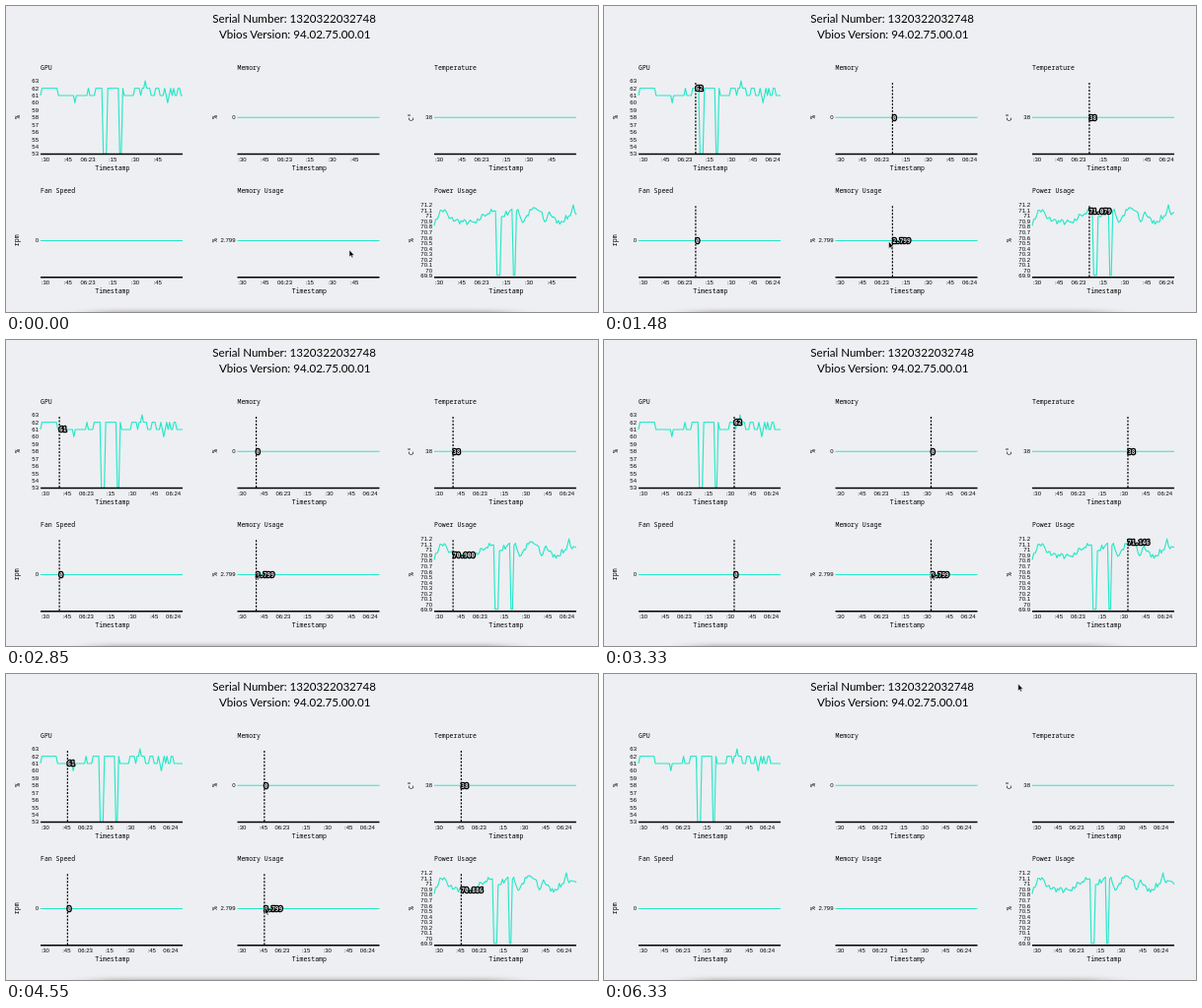
Animation, 600 px wide and 311 px high, one loop 6360 ms. Source, as an HTML page:

```html
<!DOCTYPE html>
<html lang="en">
<head>
<meta charset="utf-8">
<title>GPU monitor</title>
<style>
  html, body { margin: 0; width: 100%; height: 100%; overflow: hidden; background: #eeeff2; }
  svg { display: block; width: 600px; height: 311px; }
  text { dominant-baseline: central; text-anchor: middle; white-space: pre; fill: #000; }
  .head { font: 11.6px Lato, sans-serif; text-anchor: start; dominant-baseline: alphabetic; }
  .mono { font: 6.5px "Noto Sans Mono", monospace; }
  .tick { font: 6px "Liberation Sans", Arial, sans-serif; }
  .end { text-anchor: end; }
  .start { text-anchor: start; }
  .curve { fill: none; stroke: #26e8c8; stroke-width: 1.15; stroke-linejoin: round; }
  .axis { stroke: #000; stroke-width: 1.5; }
  .rule { stroke: #000; stroke-width: 1.2; stroke-dasharray: 2 1.5; }
  .tip { font: bold 6.1px "Noto Sans Mono", monospace; text-anchor: start; fill: #d8dadc;
         stroke: #000; stroke-width: 2.6; stroke-linejoin: round; paint-order: stroke; }
</style>
</head>
<body>
<svg id="stage" viewBox="0 0 600 311">
  <defs>
    <filter id="soft" x="-20%" y="-300%" width="140%" height="700%"><feGaussianBlur stdDeviation="16 2.2"/></filter>
  </defs>
  <rect x="90" y="310" width="418" height="6" fill="#888" opacity=".65" filter="url(#soft)"/>
  <text class="head" x="209.3" y="17.4">Serial Number: 1320322032748</text>
  <text class="head" x="216" y="33">Vbios Version: 94.02.75.00.01</text>
</svg>
<script>
const LOOP = 6360, WIDTH = 144, SPAN = 95;
const stage = document.getElementById('stage');

function add(parent, tag, attrs, text) {
  const el = document.createElementNS('http://www.w3.org/2000/svg', tag);
  for (const k in attrs) el.setAttribute(k, attrs[k]);
  if (text !== undefined) el.textContent = text;
  parent.appendChild(el);
  return el;
}
const label = (parent, cls, x, y, text) => add(parent, 'text', { class: cls, x, y }, text);
const range = (n, f) => Array.from({ length: n }, (_, i) => f(i));
const linear = u => u;
const cosine = u => (1 - Math.cos(Math.PI * u)) / 2;

// Value at t between [time, value] keys.
function between(keys, t, ease) {
  const i = Math.max(1, keys.findIndex(k => k[0] >= t));
  const [t0, a] = keys[i - 1], [t1, b] = keys[i];
  return a + (b - a) * ease((t - t0) / (t1 - t0));
}

// 1 inside [a, b], falling to 0 within one second outside; the strongest of several.
const pulse = (s, spans) => Math.max(...spans.map(([a, b = a]) =>
  Math.max(0, 1 - Math.max(a - s, s - b, 0))));

// Each series holds one value per second.
const stalls = [[42, 44], [53, 54]];
const busy = [[1, 11], [32], [37, 55], [63, 66], [68, 73], [77, 79], [83], [87], [89], [92, 93]];
const load = range(102, s => {
  const v = 61 + pulse(s, busy) + pulse(s, [[70]]) - pulse(s, [[23], [85]]);
  return v + (53 - v) * pulse(s, stalls);
});

let seed = 7;
const random = () => (seed = seed * 16807 % 2147483647) / 2147483647;
const trend = [[0, .82], [4, 1.1], [8, 1.08], [10, .95], [19, .886], [28, .87], [33, 1.02], [39, 1.079],
  [45, .98], [51, 1.1], [56, 1.12], [59, .88], [66, 1.146], [71, 1.08], [74, .89], [77, 1.07],
  [82, .865], [91, 1], [93, 1.2], [95, 1.02], [101, .99]];
const power = range(102, s => {
  const jitter = (random() - .5) * .11;
  const v = 70 + between(trend, s, linear) + (trend.some(k => k[0] === s) ? 0 : jitter);
  return v + (69.915 - v) * pulse(s, stalls);
});
const flat = v => range(102, () => v);

function panel(title, unit, col, row, values, ticks, scaleY, digits = 0) {
  const g = add(stage, 'g', { transform: `translate(${35 + 199.5 * col} ${125.3 * row})` });
  const unitX = unit === 'rpm' ? -25 : -23.5;
  label(g, 'mono start', 0, 62.3, title);
  add(g, 'text', { class: 'mono', transform: `translate(${unitX} 113) rotate(-90)` }, unit);
  ticks.forEach(v => label(g, 'tick end', -2, scaleY(v), v));
  label(g, 'mono', 72.8, 164.7, 'Timestamp');
  const curve = add(g, 'path', { class: 'curve' });
  add(g, 'path', { class: 'axis', d: `M0 150.5H${WIDTH}` });
  const times = [':30', ':45', '06:23', ':15', ':30', ':45', '06:24'].map(t => label(g, 'tick', 0, 156.2, t));
  const hover = add(g, 'g', {});
  add(hover, 'path', { class: 'rule', d: 'M0 78V150' });
  const tip = label(hover, 'tip', 0, 0, '');

  return (extra, sec) => {
    const end = SPAN + extra, k = WIDTH / end;
    curve.setAttribute('d', 'M' + values.slice(0, end + 1)
      .map((v, s) => `${(s * k).toFixed(2)} ${scaleY(v).toFixed(2)}`).join('L'));
    times.forEach((el, i) => {
      const x = (3.3 + 15 * i) * k;
      el.setAttribute('x', x - (i % 4 === 2 ? 2.5 : 0));
      el.style.display = x < 141 ? '' : 'none';
    });
    hover.style.display = sec === null ? 'none' : '';
    if (sec === null) return;
    hover.setAttribute('transform', `translate(${sec * k} 0)`);
    tip.setAttribute('y', scaleY(values[sec]));
    tip.textContent = values[sec].toFixed(digits);
  };
}

const middle = () => 113.2;
const panels = [
  panel('GPU', '%', 0, 0, load, range(11, i => 63 - i), v => 150.4 - (v - 53) * 7.43),
  panel('Memory', '%', 1, 0, flat(0), [0], middle),
  panel('Temperature', 'C°', 2, 0, flat(38), [38], middle),
  panel('Fan Speed', 'rpm', 0, 1, flat(0), [0], middle),
  panel('Memory Usage', '%', 1, 1, flat(2.799), [2.799], middle, 3),
  panel('Power Usage', '%', 2, 1, power, range(14, i => (712 - i) / 10), v => 149.2 - (v - 69.9) * 55.7, 3)
];
const arrow = add(stage, 'path', {
  d: 'M0 0V7L1.6 5.6 2.7 8 3.8 7.5 2.8 5.2H5Z', fill: '#000', stroke: '#fff', 'stroke-width': .5
});

// Turning points of the pointer; x is measured from the chart's left edge.
const sweepX = [[0, 113.5], [330, 30], [655, 117], [980, 18], [1285, 103], [1675, 6], [2420, 131],
  [2900, 15], [3330, 97], [3680, 6], [3930, 115], [4550, 27.8], [5300, 83], [5580, 2], [5900, 2],
  [6160, 134], [LOOP, 188]];
const sweepY = [[0, 248], [2300, 236], [6140, 238], [LOOP, 0]];

function draw() {
  const t = performance.now() % LOOP;
  const x = between(sweepX, t, cosine), y = between(sweepY, t, cosine);
  const extra = Math.floor((t + 594) / 1029);
  const inside = t >= 30 && x <= WIDTH && y > 203;
  // The rule trails the pointer slightly and snaps to whole seconds.
  const trail = inside && between(sweepX, t - 10, cosine);
  const sec = inside ? Math.round(trail * (SPAN + extra) / WIDTH) : null;
  panels.forEach(update => update(extra, sec));
  arrow.setAttribute('transform', `translate(${234.5 + x} ${y})`);
  requestAnimationFrame(draw);
}
draw();
</script>
</body>
</html>
```
